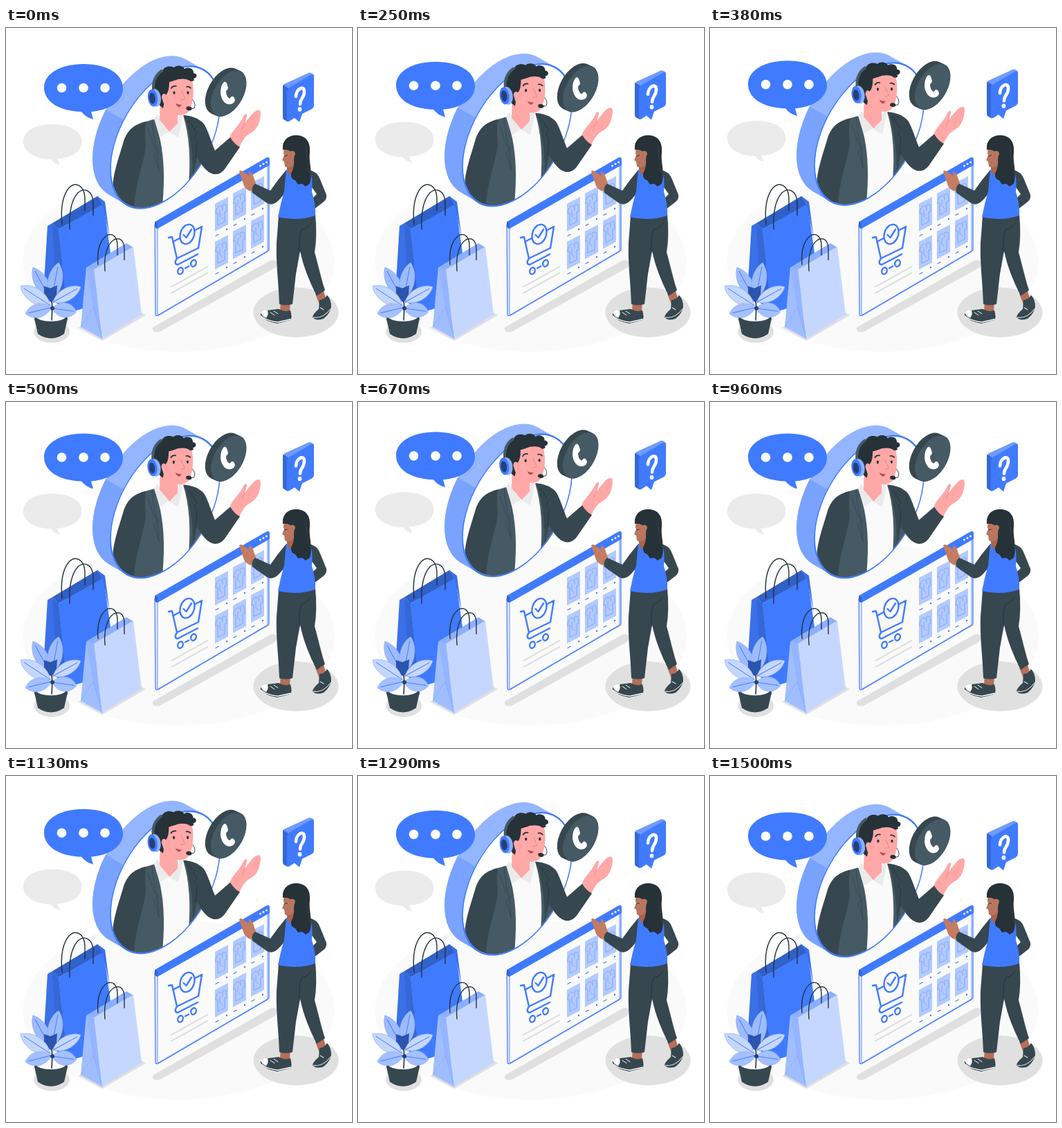
Animation, 500 px wide and 500 px high, one loop 1540 ms. Source, as an HTML page:

```html
<!DOCTYPE html>
<html lang="en">
<head>
<meta charset="utf-8">
<title>Online support</title>
<style>
html, body { margin: 0; width: 100%; height: 100%; overflow: hidden; background: #fff; }
svg { display: block; width: 100vw; height: 100vh; }
.line { fill: none; stroke-linecap: round; stroke-linejoin: round; }
</style>
</head>
<body>
<svg viewBox="0 0 500 500">
  <defs>
    <clipPath id="disc"><circle r="91" transform="matrix(.86 -.5 0 1 230 158)"/></clipPath>
    <clipPath id="lower"><path d="M90 87L170 133L200 300H90Z"/></clipPath>
    <g id="rim" transform="matrix(.86 -.5 0 1 230 158)">
      <path d="M0 0L-30 -30" stroke-width="184" stroke-linecap="round"/>
    </g>
    <g id="card">
      <path d="M302 254L321 244V284L302 294Z" fill="#b3caff"/>
      <path class="line" d="M305 260L309 257Q311 260 314 255L318 255L319 265L316 266V280L306 285V268L303 268ZM309 264V272L313 276M313 258V263" stroke="#7197f2" stroke-width=".7"/>
      <path class="line" d="M303 300.500L307 298.300" stroke="#407bff" stroke-width="1.200"/>
      <circle cx="319" cy="291" r="1.200" fill="#407bff"/>
    </g>
  </defs>

  <ellipse cx="249.500" cy="338" rx="225" ry="130" fill="#fafafa"/>
  <g fill="#e0e0e0">
    <ellipse cx="419" cy="411" rx="61.500" ry="36"/>
    <ellipse cx="66" cy="439" rx="26" ry="16"/>
    <path d="M104 433L139 452L202 415L192 409Z"/>
    <path d="M213 432L382 336Q388 334 392 338Q393 343 388 347L222 439Q215 441 212 437Q211 434 213 432Z"/>
  </g>

  <g class="float" data-rise="10">
    <use href="#rim" stroke="#94b5ff"/>
    <g clip-path="url(#lower)"><use href="#rim" stroke="#79a3ff"/></g>
    <circle r="92" transform="matrix(.86 -.5 0 1 230 158)" fill="#fff"/>
    <g clip-path="url(#disc)">
      <path d="M203 135C184 139 174 149 169 167C161 193 155 211 154 230L165 275H230V180Z" fill="#37474f"/>
      <path d="M217 131L203 135C200 141 201 155 202 171C199 200 186 220 184 275H230L242 205Z" fill="#455a64"/>
      <path d="M214 131L230 149L255 136L260 126L268 155L267 235L225 270C229 225 232 180 214 131Z" fill="#fafafa"/>
      <path d="M211 133C212 154 221 187 221 208M205 145L214 172L221 177L214 183L221 207" class="line" stroke="#37474f" stroke-width=".8"/>
      <path d="M256 126L277 131L283 190L279 212L264 225C267 190 265 155 256 126Z" fill="#455a64"/>
    </g>
    <circle class="line" r="91.800" transform="matrix(.86 -.5 0 1 230 158)" stroke="#407bff" stroke-width="2"/>
    <path d="M323 160C325 149 336 143 343 128C346 123 349 124 348 128L345 138C351 130 358 120 363 119Q368 117 368 124C367 137 363 146 355 151C347 155 342 161 337 173Z" fill="#ffa8a7"/>
    <path d="M345 138L341 147" class="line" stroke="#ed847e" stroke-width=".8"/>
    <path d="M257 126C268 127 281 131 287 140C293 151 297 165 302 177L324 158Q330 168 338 172L316 204Q309 213 299 211C289 208 283 198 276 187L270 214C270 180 266 148 257 126Z" fill="#37474f"/>
    <path d="M264 133L276 152L272 157L276 164L274 187" class="line" stroke="#263238" stroke-width=".8"/>

    <path d="M219 125L214 131L222 158L235 150L249 158L256 127L251 122Q246 138 236 146Z" fill="#ebebeb"/>
    <g id="head">
      <path d="M223 105L222 133L236 150L248 138V122Z" fill="#ffa8a7"/>
      <path d="M228 78Q250 64 269 75C273 92 270 109 265 119C261 126 252 127 245 125Q232 121 226 109Z" fill="#ffa8a7"/>
      <path d="M227 116Q217 110 215 93C210 77 216 67 226 63C228 55 237 54 243 57C249 52 257 56 258 59C265 55 272 60 271 65C278 66 276 73 271 73Q274 77 267 77Q261 72 249 74Q240 77 236 78Q236 92 231 97Z" fill="#263238"/>
      <path d="M225 100Q226 93 231 96Q234 103 228 110Z" fill="#ffa8a7"/>
      <path d="M213 89Q212 71 225 62" class="line" stroke="#455a64" stroke-width="4"/>
      <ellipse cx="216" cy="101" rx="8" ry="13" fill="#8cb0ff" transform="rotate(-8 216 101)"/>
      <ellipse cx="212" cy="101" rx="7" ry="12.500" fill="#407bff" transform="rotate(-8 212 101)"/>
      <ellipse cx="211.500" cy="101.500" rx="4.300" ry="8" fill="#263f75" transform="rotate(-8 211 102)"/>
      <g fill="#263238"><ellipse cx="243" cy="93.500" rx="1.600" ry="2.300"/><ellipse cx="263" cy="93.500" rx="1.600" ry="2.300"/></g>
      <path d="M239 87Q241 83 246 84M261 85Q264 84 267 87" class="line" stroke="#263238" stroke-width="1.700"/>
      <path d="M254 91L259 103L253 104" class="line" stroke="#ed847e" stroke-width=".9"/>
      <path d="M245 109Q250 111 254 111Q252 115 249 114Q246 112 245 109Z" fill="#b94f4f"/>
      <path d="M270 104Q275 110 272 116L267 117" class="line" stroke="#263238" stroke-width=".9"/>
      <ellipse cx="264.500" cy="116.300" rx="4.200" ry="2.900" fill="#263238" transform="rotate(10 264 116)"/>
    </g>
  </g>

  <g class="float" data-rise="10">
    <path d="M112 52C146 52 169 66 169 87C169 107 148 119 123 121L126 132Q115 129 109 121C76 120 55 106 55 86C55 66 79 52 112 52Z" fill="#407bff"/>
    <g fill="#fff"><circle cx="80.500" cy="86.500" r="6.800"/><circle cx="112" cy="86.500" r="6.800"/><circle cx="143" cy="86.500" r="6.800"/></g>
    <path d="M67 139C92 139 109.500 149 109.500 164C109.500 179 94 188 74 189L78 198Q69 196 65 190C41 189 25 179 25 164C25 149 42 139 67 139Z" fill="#ebebeb"/>
  </g>

  <g class="float" data-rise="20">
    <g transform="matrix(.866 -.5 0 1 321.500 94.500)">
      <path d="M0 0L-9 -8" stroke="#37474f" stroke-width="60" stroke-linecap="round"/>
      <circle r="29.500" fill="#455a64"/>
    </g>
    <path d="M314 79Q317 76 319 80L321 86Q321 89 318 91Q318 99 323 102L326 99Q328 98 330 101L331 104Q330 109 325 110C317 112 311 104 310 94Q310 84 314 79Z" fill="#fff"/>
  </g>

  <g class="float" data-rise="10">
    <path d="M402 81L438 64.500Q441 64 444 67L408 87L400 83Z" fill="#6f9bff"/>
    <path d="M400 83Q401 82 408 87L407 135.500L401 132Q400 131 400 129Z" fill="#3567d6"/>
    <path d="M409 86L442 67Q445 66 445 70V112Q445 115 442 117L428 124L424 136L417 130L409 135Q406 136 406 132V91Q406 88 409 86Z" fill="#407bff"/>
    <path d="M419 99C419 88 431 82 431 92C431 102 425 101 425 110" class="line" stroke="#fff" stroke-width="4.600"/>
    <ellipse cx="424.500" cy="117.500" rx="2.800" ry="3.200" fill="#fff"/>
  </g>

  <!-- shopping bags -->
  <path d="M67 282L132 243L141 255L76 291Z" fill="#3060c8"/>
  <path d="M76 291L141 254L151 325L130 400L88 412Z" fill="#407bff"/>
  <path d="M67 282L60 286L54 384L88 408L76 291Z" fill="#3a70e8"/>
  <path d="M67 282L71 350L54 384L88 408L76 291Z" fill="#3567d6"/>
  <path d="M132 243L143 251L150 305L141 260Z" fill="#3a70e8"/>
  <g class="line" stroke="#263238" stroke-width="1.400">
    <path d="M81 284C79 263 80 244 91 231C101 221 113 228 114 245V264"/>
    <path d="M92 291C91 270 94 249 104 238C115 229 125 237 126 251V271"/>
  </g>
  <path d="M116 346L174 311L184 317L127 350Z" fill="#8cb0ff"/>
  <path d="M116 346L127 349L139 449L108 432Z" fill="#a0beff"/>
  <path d="M116 346L126 404L139 449L127 349Z" fill="#94b5ff"/>
  <path d="M127 349L184 316L196 414L139 449Z" fill="#c6d7ff"/>
  <path d="M126 404L108 432M126 404L139 449" class="line" stroke="#83a9fb" stroke-width=".7"/>
  <g class="line" stroke="#263238" stroke-width="1.400">
    <path d="M133 342C131 322 136 305 147 299C156 296 161 304 161 315V328"/>
    <path d="M143 351C141 330 146 312 156 306C166 301 171 309 171 320V335"/>
  </g>

  <!-- plant -->
  <path d="M41 420L46 442Q65 455 84 442L89 420Z" fill="#37474f"/>
  <ellipse cx="65" cy="420" rx="24" ry="10" fill="#37474f"/>
  <ellipse cx="65" cy="417" rx="21" ry="7" fill="#fafafa"/>
  <path d="M66 422Q68 400 64 375" class="line" stroke="#263238" stroke-width="1.600"/>
  <g id="leaves"></g>

  <!-- shop window -->
  <path d="M215 284L378 189Q380 188 380 191V320Q380 322 378 323L220 415.500Q216 417 216 413Z" fill="#dfe8ff" stroke="#407bff" stroke-width="1.200"/>
  <path d="M219 289L378 198V322L219 415Z" fill="#fafafa" stroke="#407bff" stroke-width=".8"/>
  <path d="M215 280L377 187Q381 186 381 190V198L219 290Q215 289 215 285Z" fill="#407bff"/>
  <path d="M215 280L219 282V290Q215 289 215 285Z" fill="#3163cf"/>
  <g fill="#fff"><circle cx="367.500" cy="199" r="1.500"/><circle cx="372" cy="196.500" r="1.500"/><circle cx="376.500" cy="194" r="1.500"/></g>
  <g class="line" stroke="#407bff" stroke-width="2.400">
    <path d="M235 303L240 302L247 333L278 318L283 287L241 309M247 333Q242 341 248 342L277 327"/>
    <ellipse cx="252" cy="351" rx="3.700" ry="4.800" transform="rotate(20 252 351)"/>
    <ellipse cx="271" cy="340" rx="3.700" ry="4.800" transform="rotate(20 271 340)"/>
    <path d="M259 347L264 344.500"/>
    <ellipse cx="262" cy="298" rx="10" ry="14.500" transform="rotate(18 262 298)" fill="#fafafa"/>
    <path d="M256.500 299L260.500 303L268 291"/>
  </g>
  <path d="M239 374L291 345M239 383L291 354" class="line" stroke="#e0e0e0" stroke-width="2.200"/>
  <g id="cards"></g>

  <!-- customer -->
  <path d="M397 392H411L410 412L396 408ZM447 384L459 379L463 395L453 400Z" fill="#b46f59"/>
  <path d="M368 412Q370 407 378 408L394 406Q402 411 411 408Q414 418 411 422L392 427Q374 424 368 415Z" fill="#37474f"/>
  <path d="M368 411Q372 406 378 408Q380 414 376 419Q369 416 368 411Z" fill="#fff"/>
  <path d="M369 417Q380 424 393 425L411 421" class="line" stroke="#fff" stroke-width="1.400"/>
  <path d="M382 411L388 415M387 409L393 413" class="line" stroke="#fff" stroke-width="1"/>
  <path d="M453 393Q460 393 464 386Q470 392 470 403Q468 413 459 420Q448 424 443 418Q443 414 452 406Z" fill="#37474f"/>
  <path d="M444 418Q457 421 469 406M454 404L459 407" class="line" stroke="#dfe3e4" stroke-width="1.100"/>
  <path d="M394 271L447 269Q450 301 446 324C452 346 456 364 461 379L449 387C438 365 430 346 425 322L419 355L414 399Q404 402 395 399C394 365 390 344 391 310Z" fill="#37474f"/>
  <path d="M424 324Q423 302 427 292Q435 290 441 282" class="line" stroke="#263238" stroke-width="1"/>
  <path d="M437 205Q450 207 454 219L463 241Q464 248 458 252L445 262L440 257L444 245L449 240L439 226Z" fill="#37474f"/>
  <path d="M337 207Q340 204 346 210L351 213L351 207Q354 207 357 213L361 225L355 236Q348 235 344 228Z" fill="#c47c62"/>
  <path d="M405 205Q393 219 382 235L360 225Q354 230 356 238L377 253Q386 258 395 248L411 230Z" fill="#37474f"/>
  <path d="M405 205Q425 212 439 205Q444 216 442 237Q448 256 447 271Q421 280 393 273Q397 253 402 236Z" fill="#407bff"/>
  <path d="M406 195H424V211Q413 218 406 207Z" fill="#a9654f"/>
  <path d="M404 171Q399 179 402 184L399 191L402 193L403 200Q407 204 414 199L425 182L417 167Z" fill="#b97560"/>
  <path d="M403 185L406 184" class="line" stroke="#263238" stroke-width="1.100"/>
  <path d="M400 170C402 159 411 154 421 155C434 156 440 165 439 179C437 194 444 210 439 225L433 229L428 225L422 226L418 220Q411 218 412 210Q417 202 416 190Q418 180 411 178Q406 175 400 176Z" fill="#263238"/>
  <path d="M410 181Q412 176 416 178Q420 181 416 186Q413 190 410 187Z" fill="#b97560"/>
  <path d="M434 172Q434 194 439 211" class="line" stroke="#37474f" stroke-width=".8"/>
</svg>

<script>
const LOOP = 1540, STEPS = 37;
const $ = id => document.getElementById(id);

// base x, base y, tip x, tip y, half width
const leaves = [
  [64, 392, 39, 346, 13], [66, 392, 76, 339, 14], [64, 401, 21, 373, 14],
  [68, 396, 108, 374, 12], [67, 405, 102, 410, 14], [65, 404, 28, 413, 13]
];
const tints = ['#9dbcff', '#9dbcff', '#c6d7ff', '#c6d7ff', '#a5c0ff', '#a5c0ff'];

function leaf([x, y, tx, ty, w], fill) {
  const len = Math.hypot(tx - x, ty - y);
  const turn = Math.atan2(ty - y, tx - x) * 180 / Math.PI;
  return `<g transform="translate(${x} ${y}) rotate(${turn})">
    <path d="M0 0C${len * .25} ${-w} ${len * .75} ${-w} ${len} 0C${len * .75} ${w} ${len * .25} ${w} 0 0Z"
      fill="${fill}" stroke="#7ea6fb" stroke-width=".6"/>
    <path class="line" d="M0 0H${len * .88}" stroke="#407bff" stroke-width=".9"/></g>`;
}

const foliage = leaves.map((l, i) => leaf(l, tints[i]));
const heart = '<path d="M55 373L64 376L74 372L73 386L66 397L55 389Z" fill="#2c55ad"/>';
$('leaves').innerHTML = foliage.slice(0, 2).join('') + heart + foliage.slice(2).join('') +
  '<circle cx="67" cy="405" r="3" fill="#263f75"/>';

let cards = '';
for (let row = 0; row < 2; row++)
  for (let col = 0; col < 3; col++)
    cards += `<use href="#card" x="${col * 26}" y="${row * 55 - col * 15}"/>`;
$('cards').innerHTML = cards;

const floaters = [...document.querySelectorAll('.float')];

function draw(now) {
  const step = Math.floor((now % LOOP) / LOOP * STEPS);
  const phase = (step + 1) / STEPS;
  const lift = 1 - Math.abs(1 - 2 * phase);
  for (const el of floaters) {
    const rise = +el.dataset.rise;
    el.setAttribute('transform', `translate(0 ${rise * (.054 - lift)})`);
  }
  $('head').setAttribute('transform', `rotate(${-1.4 * lift} 235 130)`);
}

const start = performance.now();
function tick() {
  draw(performance.now() - start);
  requestAnimationFrame(tick);
}
tick();
</script>
</body>
</html>
```
